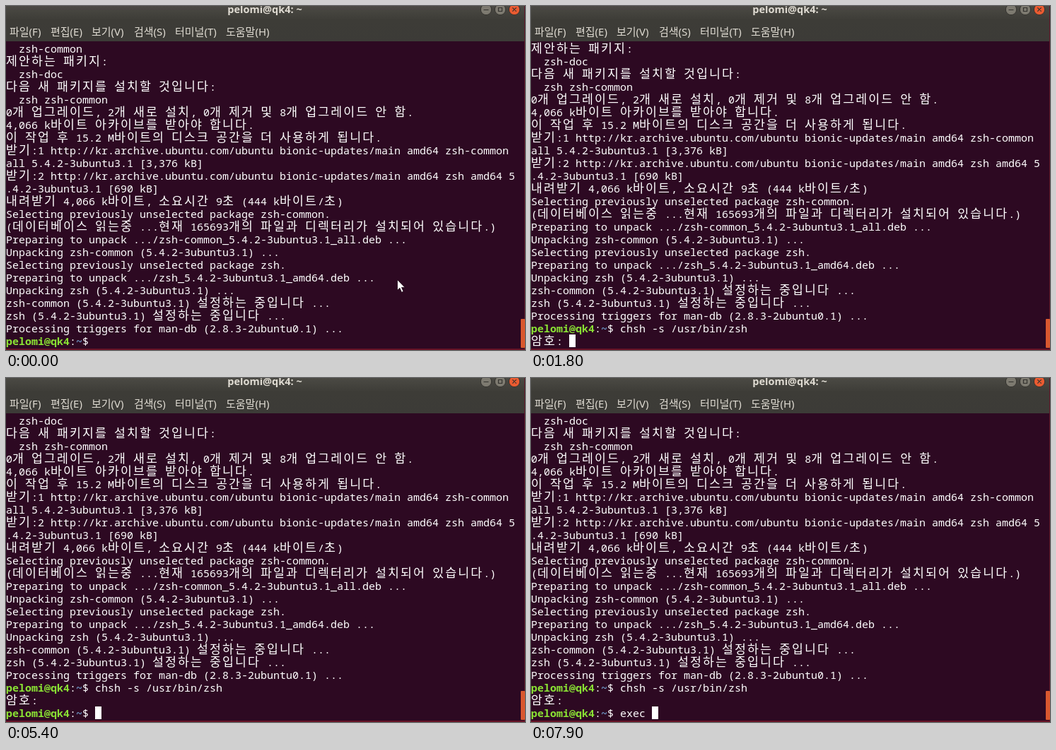
These frames come from a looping animation (734 by 487 pixels, 8000 ms). An HTML page:

```html
<!DOCTYPE html>
<html lang="ko">
<head>
<meta charset="utf-8">
<title>Terminal</title>
<style>
html, body { margin: 0; width: 100%; height: 100%; overflow: hidden; }
#stage {
  position: relative; width: 734px; height: 487px; overflow: hidden;
  background: #2d0922; color: #fff;
}
#stage > * { position: absolute; }
#bar {
  left: 0; top: 0; width: 734px; height: 50px;
  background: linear-gradient(#4b4a44, #3d3c37 20px, #3c3b37);
  color: #dfdbd2; font: 15px/20px "Noto Sans", "Noto Sans CJK KR", "Noto Sans CJK", sans-serif;
}
#bar > * { position: absolute; white-space: pre; }
#title { left: 266px; top: -6px; width: 200px; text-align: center; font-size: 14.5px; font-weight: 600; }
#bar span { top: 26px; }
#screen {
  left: 0; top: 51px;
  font: 500 15px/18px "Noto Sans Mono", "DejaVu Sans Mono", monospace;
}
.row { height: 18px; white-space: pre; }
.row i {
  display: inline-block; width: 18px;
  font: 17.3px/0 "Noto Sans Mono CJK KR", "Noto Sans CJK KR", "Noto Sans CJK", sans-serif;
}
.user { color: #8ae234; }
.path { color: #729fcf; }
.cursor { display: inline-block; width: 9px; height: 18px; background: #fff; vertical-align: top; }
#right { left: 733px; top: 0; width: 1px; height: 487px; background: #5c1526; }
#bottom { left: 0; top: 485px; width: 734px; height: 2px; background: #661226; }
#thumb { left: 728px; top: 443px; width: 6px; height: 41px; border-radius: 1px; background: #d9582f; }
#art { left: 0; top: 0; }
</style>
</head>
<body>
<div id="stage">
  <div id="bar">
    <div id="title">pelomi@qk4: ~</div>
    <span style="left:5px">파일(F)</span>
    <span style="left:63px">편집(E)</span>
    <span style="left:121px">보기(V)</span>
    <span style="left:181px">검색(S)</span>
    <span style="left:239px">터미널(T)</span>
    <span style="left:311px">도움말(H)</span>
  </div>
  <div id="screen"></div>
  <div id="right"></div>
  <div id="bottom"></div>
  <div id="thumb"></div>
  <svg id="art" width="734" height="487" fill="none">
    <g stroke="#33322e">
      <circle cx="679" cy="5" r="7.7" fill="#7d7a70"/>
      <circle cx="699" cy="5" r="7.7" fill="#7d7a70"/>
      <circle cx="719" cy="5" r="7.7" fill="#ea5b31"/>
      <path d="M675.5 5.5h7M696.5 2.5h5v5h-5zM716.3 2.3l5.4 5.4m0-5.4l-5.4 5.4" stroke-width="1.2"/>
    </g>
    <path id="arrow" d="M553.5 387.5v15l3.4-3.2 2.6 6 2.6-1.1-2.6-5.8h4.6z" fill="#fff" stroke="#1c0515" stroke-width=".8"/>
    <path id="beam" d="M552.5 382.5h2l1 1 1-1h2M555.5 383v12M552.5 395.5h2l1-1 1 1h2" stroke="#fff"/>
  </svg>
</div>
<script>
const ROWS = 24, LOOP = 8000;
const log = `  zsh-common
제안하는 패키지:
  zsh-doc
다음 새 패키지를 설치할 것입니다:
  zsh zsh-common
0개 업그레이드, 2개 새로 설치, 0개 제거 및 8개 업그레이드 안 함.
4,066 k바이트 아카이브를 받아야 합니다.
이 작업 후 15.2 M바이트의 디스크 공간을 더 사용하게 됩니다.
받기:1 http://kr.archive.ubuntu.com/ubuntu bionic-updates/main amd64 zsh-common
all 5.4.2-3ubuntu3.1 [3,376 kB]
받기:2 http://kr.archive.ubuntu.com/ubuntu bionic-updates/main amd64 zsh amd64 5
.4.2-3ubuntu3.1 [690 kB]
내려받기 4,066 k바이트, 소요시간 9초 (444 k바이트/초)
Selecting previously unselected package zsh-common.
(데이터베이스 읽는중 ...현재 165693개의 파일과 디렉터리가 설치되어 있습니다.)
Preparing to unpack .../zsh-common_5.4.2-3ubuntu3.1_all.deb ...
Unpacking zsh-common (5.4.2-3ubuntu3.1) ...
Selecting previously unselected package zsh.
Preparing to unpack .../zsh_5.4.2-3ubuntu3.1_amd64.deb ...
Unpacking zsh (5.4.2-3ubuntu3.1) ...
zsh-common (5.4.2-3ubuntu3.1) 설정하는 중입니다 ...
zsh (5.4.2-3ubuntu3.1) 설정하는 중입니다 ...
Processing triggers for man-db (2.8.3-2ubuntu0.1) ...`.split("\n");

const prompt = '<b class="user">pelomi@qk4</b>:<b class="path">~</b>$ ';
const command = "chsh -s /usr/bin/zsh";
const password = "암호: ";
const session = [prompt + command, password];
const inputs = [prompt, password, prompt];

// [start ms, finished session lines, typed text, cursor visible]
const steps = [
  [0, 0, "", 0], [500, 0, "", 1], [800, 0, command, 1], [1300, 0, command, 0],
  [1800, 1, "", 1], [2400, 1, "", 0], [3000, 1, "", 1], [3600, 1, "", 0], [3800, 1, "", 1],
  [5400, 2, "", 1], [5900, 2, "", 0], [6600, 2, "", 1],
  [7200, 2, "e", 1], [7400, 2, "ex", 1], [7500, 2, "exe", 1],
  [7800, 2, "exec", 1], [7900, 2, "exec ", 1]
];

const byId = id => document.getElementById(id);
const screenEl = byId("screen"), arrow = byId("arrow"), beam = byId("beam");
const show = (el, visible) => { el.style.visibility = visible ? "visible" : "hidden"; };
// Hangul takes two terminal cells
const row = line => `<div class="row">${line.replace(/[가-힣]/g, "<i>$&</i>")}</div>`;

function render([, done, typed, cursor]) {
  const input = inputs[done] + typed + (cursor ? '<span class="cursor"></span>' : "");
  const lines = [...log, ...session.slice(0, done), input];
  screenEl.innerHTML = lines.slice(-ROWS).map(row).join("");
}

let current;
const start = performance.now();
function tick() {
  const t = (performance.now() - start) % LOOP;
  const step = steps.findLast(s => s[0] <= t);
  if (step !== current) render(current = step);
  show(arrow, t < 100);
  show(beam, t >= 100 && t < 1800);
  requestAnimationFrame(tick);
}
tick();
</script>
</body>
</html>
```
